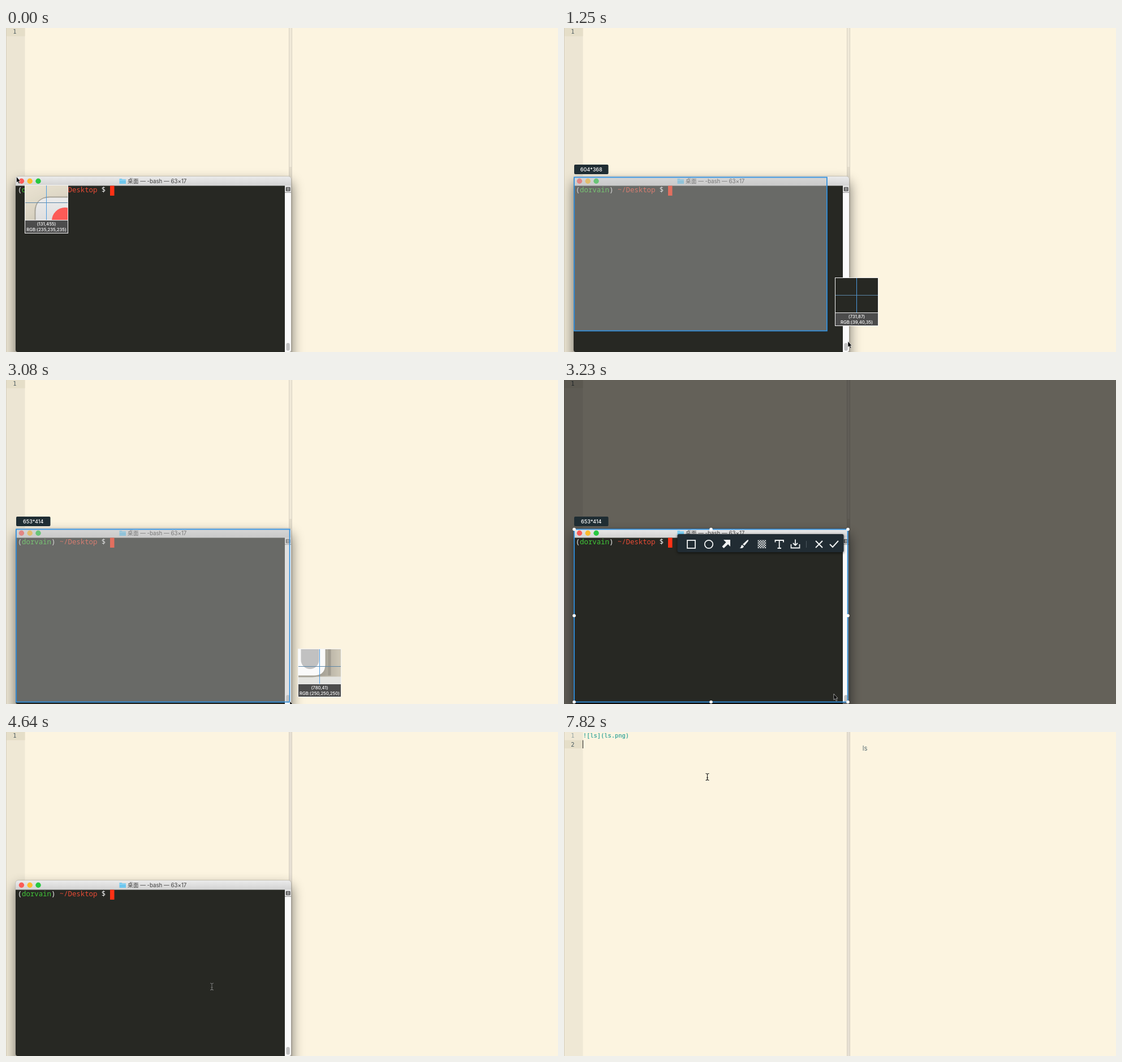
An HTML page for the animation above (8 s loop, 976x574 px).

```html
<!DOCTYPE html>
<html lang="en">
<head>
<meta charset="utf-8">
<title>Screen capture into Markdown</title>
<style>
  html, body { margin: 0; width: 100%; height: 100%; overflow: hidden; background: #fcf4e0; }
  svg { display: block; font-family: Inter, "Noto Sans CJK SC", "Noto Sans CJK", sans-serif; font-feature-settings: "calt" 0; }
  text { white-space: pre; }
  .code { font: 10.4px "DejaVu Sans Mono", monospace; }
  .term { font: 12.35px "Noto Sans Mono", "DejaVu Sans Mono", monospace; }
  .mid { text-anchor: middle; }
  .icon { fill: none; stroke: #f0f2f2; stroke-width: 1.8; }
</style>
</head>
<body>
<svg width="976" height="574" viewBox="0 0 976 574">
  <defs>
    <linearGradient id="bar" x2="0" y2="1">
      <stop stop-color="#ebebeb"/><stop offset="1" stop-color="#d1d1d1"/>
    </linearGradient>
    <pattern id="checks" width="4.2" height="4.2" patternUnits="userSpaceOnUse" x="342.5" y="283.5">
      <path d="M0 0h2.1v4.2h2.1V2.1H0z" fill="#f0f2f2"/>
    </pattern>
    <clipPath id="lens"><rect x="1" y="1" width="75" height="61"/></clipPath>
  </defs>

  <g id="scene">
    <rect width="976" height="600" fill="#fcf4e0"/>
    <rect id="gutter" width="33.5" height="574"/>
    <rect id="active" x="1" width="32.5" height="14.5" fill="#e5dec8"/>
    <path d="M.5 0V574" stroke="#d5cebd"/>
    <rect id="divider" x="500" width="6" height="574"/>
    <path d="M500.5 0V574M505.5 0V574" stroke="#d8d1c2"/>
    <rect id="thumb" x="501" y="246" width="4" height="18" fill="#e2dbca"/>
    <text id="num1" class="code mid" x="15.3" y="10">1</text>
    <text id="num2" class="code mid" x="15.3" y="25.5" fill="#4c5b60">2</text>
    <text id="line" class="code" x="33.8" y="10" fill="#2aa198" stroke="#2aa198" stroke-width=".2">![ls](ls.png)</text>
    <rect id="caret" width="1" height="14.5" fill="#222"/>
    <text id="preview" x="527.7" y="33" font-size="11.5" fill="#586e75">ls</text>

    <g id="terminal">
      <rect x="17" y="273" width="488" height="330" rx="5" opacity=".52" style="filter:blur(11px)"/>
      <rect y="574.4" width="976" height="26" fill="#e4e4e0"/>
      <rect x="16.6" y="262.6" width="487.9" height="312" rx="5" fill="#a8a498"/>
      <path d="M17 280v-12q0-5 5-5h477q5 0 5 5v12z" fill="url(#bar)"/>
      <path d="M17 279.5h476V574H21q-4 0-4-4z" fill="#272823"/>
      <path d="M493 279.5h11V570q0 4-4 4h-7z" fill="#fafafa"/>
      <path d="M493 279.5h11v11.5h-11z" fill="#e2e2e2"/>
      <path d="M493 291.5h11" stroke="#999"/>
      <path d="M495.5 282.5h6.500v6h-6.500zM496 284.500h6M496 286.500h6" fill="#fff" stroke="#222"/>
      <rect x="495.4" y="558" width="6.4" height="13.7" rx="3.2" fill="#c1c1c1"/>
      <circle cx="27.4" cy="271.2" r="4.7" fill="#fc5b57"/>
      <circle cx="42.2" cy="271.2" r="4.7" fill="#fdbc2e"/>
      <circle cx="57" cy="271.2" r="4.7" fill="#28c840"/>
      <path d="M200.5 267h4l1 1h6.5v8h-11.5z" fill="#6fc7ee"/>
      <path d="M200.5 269.5h11.5" stroke="#a5e0f8"/>
      <text class="mid" x="267.2" y="275" font-size="9.7" fill="#404040">桌面 — -bash — 63×17</text>
      <text class="term" x="20.7" y="291" fill="#f4f4f4">(<tspan fill="#40c838">dorvain</tspan>) <tspan fill="#e94b35">~/Desktop</tspan> $</text>
      <rect x="184" y="279.5" width="7.5" height="17.5" fill="#ff3115"/>
    </g>
  </g>

  <path id="dim" fill-rule="evenodd"/>

  <rect id="frame" x="18" y="264.5" stroke="#3291de" stroke-width="1.8"/>
  <g id="label">
    <rect x="18" y="242" width="60.5" height="17" rx="2" fill="#1f2d33"/>
    <text id="size" class="mid" x="48.2" y="254.3" font-size="9" font-weight="500" fill="#fff"></text>
  </g>

  <g id="tools">
    <g id="handles" fill="#fff"></g>
    <rect x="200" y="274" width="295" height="33" rx="3" opacity=".5" style="filter:blur(2px)"/>
    <rect x="200.5" y="273" width="294" height="32" rx="3" fill="#212c33"/>
    <g class="icon">
      <rect x="218" y="284" width="14" height="14"/>
      <circle cx="256" cy="291" r="7.2"/>
      <path d="M373.5 287.5v-3.5h14.5v3.5M380.7 284v14M377.5 298h6.5"/>
      <path d="M401.5 291v6.5h15V291M409 282.5v10M405 289l4 4 4-4"/>
      <path d="M445 285l12 12M457 285l-12 12M470 291l5 5 10-11" stroke-width="2"/>
    </g>
    <g fill="#f0f2f2">
      <path d="M282 283h12v12l-4-4-7.5 7-3-3 7-7.5z"/>
      <path d="M325.5 283q1.5 1-1 4l-5.5 6.5-3-2.5 6.5-6q2-2 3-2zM315 292l3 2.7q-1 4-7.5 3.3 2.5-1 2.5-3 0-2 2-3z"/>
    </g>
    <rect x="342.5" y="283.5" width="14.7" height="14.7" fill="url(#checks)"/>
    <path d="M428.5 285v12" stroke="#4c575d"/>
  </g>

  <g id="magnifier">
    <rect x=".5" y=".5" width="76" height="85" fill="#4c4c4c" stroke="#f4f4f4"/>
    <g clip-path="url(#lens)"><use id="zoom" href="#scene"/></g>
    <path d="M1 31.5h75" stroke="#5b85a6"/>
    <path d="M38.5 1v61" stroke="#4a9ae0"/>
    <path d="M1 62.5h75" stroke="#eee"/>
    <g class="mid" font-size="7.7" font-weight="500" fill="#fff">
      <text id="point" x="38.5" y="71.5"></text>
      <text id="rgb" x="38.5" y="81.5"></text>
    </g>
  </g>

  <path id="arrow" d="M0-1v10.500l2.300-2 1.800 4 1.800-.8-1.800-3.800H7z" stroke="#fff" stroke-width=".6"/>
  <path id="ibeam" d="M-3-6q3 0 3 2v8q0 2-3 2M3-6q-3 0-3 2v8q0 2 3 2M-1.5 1.5h3" fill="none" stroke-width="1.1"/>
</svg>

<script>
const $ = id => document.getElementById(id);
const set = (id, attrs) => { for (const k in attrs) $(id).setAttribute(k, attrs[k]); };
const show = (id, on) => { $(id).style.display = on ? '' : 'none'; };
const at = (x, y) => ({ transform: `translate(${x} ${y})` });

const LEFT = 18, TOP = 264, DIM = 3230, CLOSE = 4490, LIVE = 4640, EDIT = 5440, PASTE = 6330, NEWLINE = 7820;

// time, then the dragged corner; the pointer runs one stop ahead
const drag = [
  [0, 20.8, 264], [140, 18.5, 264.5], [300, 58, 289], [460, 128, 334], [620, 215, 388],
  [780, 300, 436], [940, 378, 466], [1100, 440, 508], [1250, 465.3, 536], [1410, 502, 556],
  [1570, 508, 565], [1730, 507, 569], [1880, 506, 570], [2040, 505, 571], [2200, 504, 571],
  [2350, 503, 571], [2490, 503, 570], [2640, 502, 570]
];
const beam = [[3380, 364, 451], [4940, 340, 330], [5110, 292, 175], [5270, 256, 85], [6180, 253.5, 79.5]];
// time, x, row, visible
const caret = [
  [0, 33, 0, 0], [EDIT, 33, 0, 1], [5740, 33, 0, 0], [6180, 33, 0, 1], [PASTE, 46, 0, 1],
  [6930, 46, 0, 0], [7230, 46, 0, 1], [7670, 114, 0, 1], [NEWLINE, 33, 1, 1]
];
const stepAt = (list, t) => Math.max(0, list.findLastIndex(s => s[0] <= t));

for (const x of [18, 260, 502]) for (const y of [264.5, 417.5, 570.5]) {
  if (x === 260 && y === 417.5) continue;
  $('handles').insertAdjacentHTML('beforeend', `<circle cx="${x}" cy="${y}" r="2.8"/>`);
}

function drawEditor(t) {
  const [, x, row, on] = caret[stepAt(caret, t)];
  set('gutter', { fill: t < CLOSE ? '#ece5d3' : '#efe8d5' });
  set('divider', { fill: t < CLOSE ? '#efe8d7' : '#e6dfd3' });
  set('active', { y: row * 14.5 });
  set('num1', { fill: row ? '#93a1a1' : '#4c5b60' });
  set('caret', { x, y: row * 14.5 });
  show('caret', on);
  show('num2', row);
  show('line', t >= PASTE);
  show('preview', t >= 6630);
  show('thumb', t < CLOSE);
  show('terminal', t < EDIT);
}

function drawCapture(t) {
  const i = stepAt(drag, t), [, x, y] = drag[i];
  const [, px, py] = drag[Math.min(i + 1, drag.length - 1)];
  const w = Math.round((x - LEFT) * 1.35), h = Math.round((y - TOP) * 1.353);
  const dragging = t < DIM, dimmed = !dragging && t < CLOSE;

  show('frame', i > 0 && t < CLOSE);
  show('label', i > 0 && t < CLOSE);
  set('frame', { width: x - LEFT - .4, height: y - TOP, fill: dragging ? 'rgba(189,189,189,.44)' : 'none' });
  $('size').textContent = `${w}*${h}`;

  show('tools', dimmed);
  show('dim', !dragging && t < LIVE);
  set('dim', {
    d: 'M0 0H976V574H0z' + (dimmed ? 'M18 264H502V570H18z' : ''),
    opacity: dimmed ? .6 : .3
  });

  show('magnifier', dragging);
  const shade = i ? (x > 493 ? '250,250,250' : '39,40,35') : '235,235,235';
  set('magnifier', at(Math.round(x) + (i ? 14 : 12), y + 100 > 574 ? y - 94 : y + 14));
  set('zoom', { transform: `translate(38.5 31.5) scale(5) translate(${-x} ${-y - .8})` });
  $('point').textContent = `(${127 + w},${455 - h})`;
  $('rgb').textContent = `RGB:(${shade})`;

  show('arrow', t < 3380);
  set('arrow', dragging ? at(px, py) : at(477, 557));
}

function drawBeam(t) {
  const [, x, y] = beam[stepAt(beam, t)];
  show('ibeam', t >= 3380);
  set('ibeam', { ...at(x, y), stroke: y > TOP ? '#777' : '#222' });
}

function draw(now) {
  const t = now % 8000;
  drawEditor(t);
  drawCapture(t);
  drawBeam(t);
  requestAnimationFrame(draw);
}
draw(0);
</script>
</body>
</html>
```
